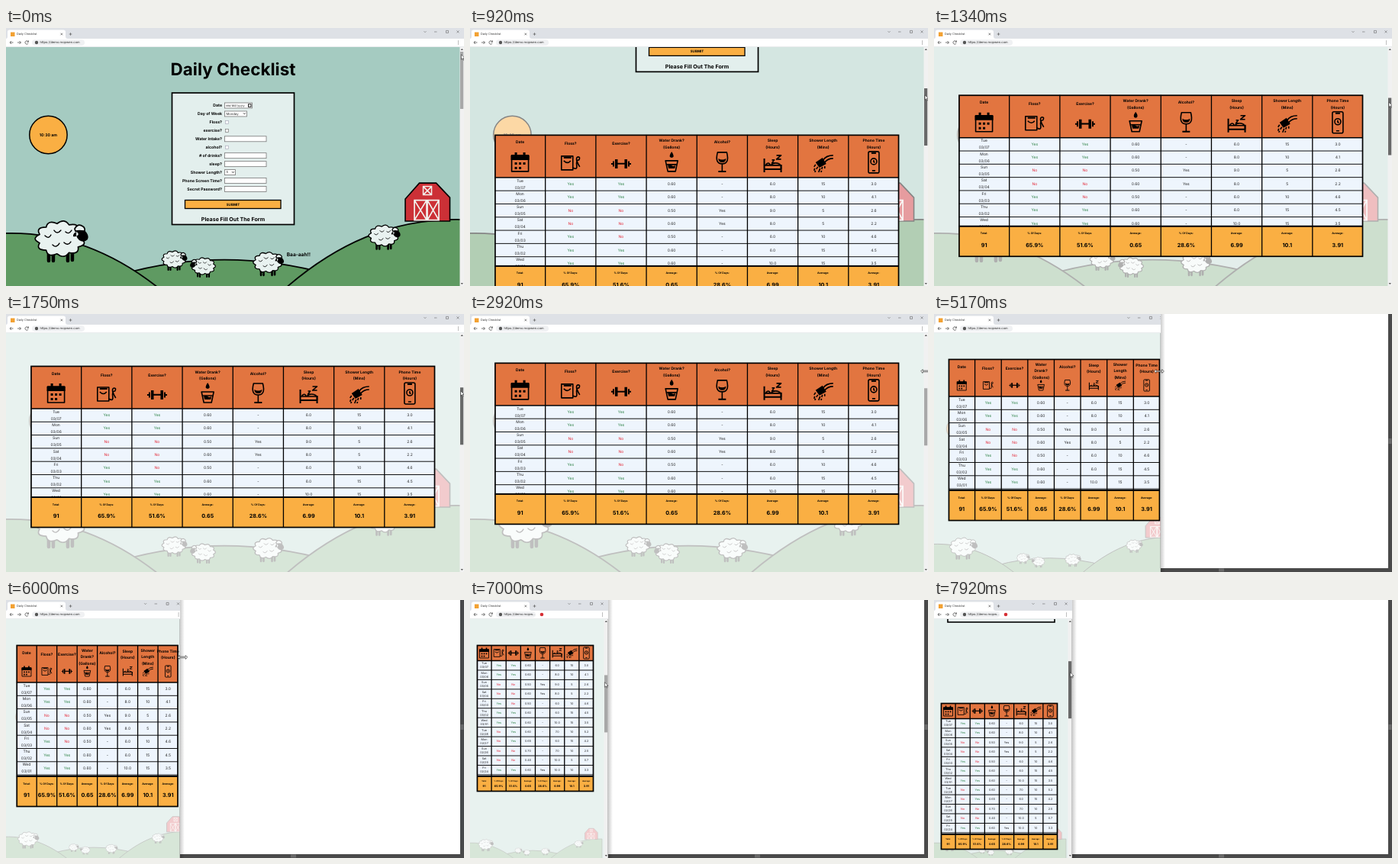
An HTML page with a canvas for the animation above (8000 ms loop, 600 by 338 pixels).

```html
<!DOCTYPE html>
<html lang="en">
<head>
<meta charset="utf-8">
<title>Daily Checklist</title>
<style>
html, body { margin: 0; width: 100%; height: 100%; overflow: hidden; background: #fff; }
canvas { display: block; width: 600px; height: 338px; }
</style>
</head>
<body>
<canvas id="stage" width="600" height="338"></canvas>
<script>
const ctx = document.getElementById('stage').getContext('2d');
const LOOP = 8000, W = 600, H = 338, PAGE_TOP = 25;
const START_TOP = 340, TEXT_SCALE = 10;
const ORANGE = '#faaf43', RUST = '#e27540', PALE = '#eef5fd';

// Keyframes: [time, value]
const motion = {
  tableTop: [[150, START_TOP], [920, 140], [1500, 68], [2600, 68], [3300, 59], [7080, 59], [7920, 135]],
  crop: [[3000, 600], [3920, 412], [5170, 297], [5900, 235], [6670, 181]],
  band: [[3300, 0], [3920, 13], [4700, 0]],
  left: [[3340, 32.5], [3920, 28], [5170, 19], [6750, 9]],
  right: [[3340, 562], [3920, 478], [5170, 296], [6750, 162]],
  head: [[3340, 56], [3920, 52], [5170, 49]],
  fade: [[250, 0], [920, 0.52], [1500, 0.75], [7200, 0.75], [7920, 0.72]],
  mouseX: [[0, 598], [2300, 597], [3000, 597], [3920, 407], [5170, 295], [6670, 180], [7000, 178], [7920, 180]],
  mouseY: [[150, 38], [920, 91], [1500, 104], [2300, 104], [2600, 75], [6600, 75], [6950, 111], [7080, 111], [7920, 98]]
};

const days = [
  'Tue 03/07 Yes Yes 0.60 - 6.0 15 3.0', 'Mon 03/06 Yes Yes 0.60 - 8.0 10 4.1',
  'Sun 03/05 No No 0.50 Yes 9.0 5 2.6', 'Sat 03/04 No No 0.60 Yes 8.0 5 2.2',
  'Fri 03/03 Yes No 0.50 - 6.0 10 4.6', 'Thu 03/02 Yes Yes 0.60 - 6.0 15 4.5',
  'Wed 03/01 Yes Yes 0.60 - 10.0 15 3.5', 'Tue 02/28 No Yes 0.60 - 7.0 10 5.2',
  'Mon 02/27 No Yes 0.65 - 6.0 15 4.2', 'Sun 02/26 No No 0.70 - 7.0 10 2.5',
  'Sat 02/25 No No 0.40 - 10.0 5 0.7', 'Fri 02/24 Yes Yes 0.60 Yes 10.0 10 3.3'
].map(row => row.split(' '));
const headings = ['Date', 'Floss?', 'Exercise?', 'Water Drank?|(Gallons)', 'Alcohol?', 'Sleep|(Hours)', 'Shower Length|(Mins)', 'Phone Time|(Hours)'];
const totals = ['Total:|91', '% Of Days:|65.9%', '% Of Days:|51.6%', 'Average:|0.65', '% Of Days:|28.6%', 'Average:|6.99', 'Average:|10.1', 'Average:|3.91'];

// Icons in a 24 unit box centred on the origin: [filled path, stroked path]
const icons = [
  ['M-12-9h24v6h-24zM-7-13h3v5h-3zM4-13h3v5h-3zM-7 0h3v3h-3zM-1.5 0h3v3h-3zM4 0h3v3h-3zM-7 6h3v3h-3zM-1.500 6h3v3h-3z', 'M-11-9h22v21h-22z'],
  ['M-9-8h10v2h-10z', 'M-12-9H3V9H-12zM-9-3q5 5 9 0M3 6q6 4 5-3t3-7q2-4-1-4t-2 5q2 5 4 8'],
  ['M-8-6h3.500V6h-3.500zM4.500-6h3.500V6h-3.500zM-11-3.500h2v7h-2zM9-3.500h2v7h-2zM-13-1h3v2h-3zM10-1h3v2h-3zM-5-1.200H5v1.200H-5z', 'M-5 0H5'],
  ['M0-14q5 7 0 8q-5-1 0-8zM-5 4q3-2 5 0t5 0L4 8H-4z', 'M-8-2H8L5 12H-5zM-6 3H6'],
  ['M-5-5q5 3 10 0q0 5-5 5t-5-5zM-5 11H5v2H-5z', 'M-6-13H6q4 15-6 15t-6-15zM0 2v10'],
  ['M-12-7h2V11h-2zM10 1h2v10h-2zM-11 6h22v2h-22z', 'M-11 2H11v5M-9 1q4-4 6 1M-2 1q6-4 12 0M-1-5h3l-3 4h3M5-11h6l-6 5h6'],
  ['M-10-1L-1-7L4 1L-5 6z', 'M0-4Q4-10 13-10M2-1Q6-6 13-6M-10 2l-2 3M-11 7l-1 3M-7 5l-2 3M-10 10l-1 2M-4 7l-2 5M-1 5l-1 3M-2 10l-1 2M2 4l0 3'],
  ['M-3-13h6v2h-6z', 'M-5-14H5Q7-14 7-12V12Q7 14 5 14H-5Q-7 14-7 12V-12Q-7-14-5-14zM-4-1a4 4 0 1 0 8 0a4 4 0 1 0-8 0M0-3v2.500l1.500 1M-2 11h4']
].map(pair => pair.map(d => new Path2D(d)));
const iconDrop = [36, 37, 38, 36, 36, 38, 37, 36];

function at(keys, t) {
  if (t <= keys[0][0]) return keys[0][1];
  for (let i = 1; i < keys.length; i++) {
    const [t0, v0] = keys[i - 1], [t1, v1] = keys[i];
    if (t < t1) return v0 + (v1 - v0) * (t - t0) / (t1 - t0);
  }
  return keys[keys.length - 1][1];
}

function rect(x, y, w, h, fill, stroke, line = 1) {
  if (fill) { ctx.fillStyle = fill; ctx.fillRect(x, y, w, h); }
  if (stroke) { ctx.strokeStyle = stroke; ctx.lineWidth = line; ctx.strokeRect(x, y, w, h); }
}

function shape(d, fill, stroke, line = 1) {
  const path = typeof d === 'string' ? new Path2D(d) : d;
  if (fill) { ctx.fillStyle = fill; ctx.fill(path); }
  if (stroke) { ctx.strokeStyle = stroke; ctx.lineWidth = line; ctx.stroke(path); }
}

function disc(x, y, r, fill, stroke, line) {
  const path = new Path2D();
  path.arc(x, y, r, 0, Math.PI * 2);
  shape(path, fill, stroke, line);
}

// Tiny type is set large and scaled down, so that hinting does not distort it.
function text(str, x, y, size, weight = 400, color = '#000', align = 'center', family = 'Inter, "Open Sans", sans-serif') {
  ctx.save();
  ctx.translate(x, y);
  ctx.scale(1 / TEXT_SCALE, 1 / TEXT_SCALE);
  ctx.font = `${weight} ${size * TEXT_SCALE}px ${family}`;
  ctx.textRendering = 'geometricPrecision';
  ctx.fillStyle = color;
  ctx.textAlign = align;
  ctx.textBaseline = 'middle';
  ctx.fillText(str, 0, 0);
  ctx.restore();
}

function within(x, y, w, h, draw) {
  ctx.save();
  ctx.beginPath();
  ctx.rect(x, y, w, h);
  ctx.clip();
  draw();
  ctx.restore();
}

function sheep(x, y, size, dir) {
  const line = 1.7 / Math.sqrt(size);
  ctx.save();
  ctx.translate(x, y);
  ctx.scale(size * dir, size);
  ctx.lineCap = ctx.lineJoin = 'round';
  shape('M-15 16V29M-9 17V29M10 16V29M16 15V28', null, '#000', 4.5);
  const fleece = new Path2D(), bumps = 11;
  const point = (i, k) => [28 * k * Math.cos(i / bumps * 2 * Math.PI), 20 * k * Math.sin(i / bumps * 2 * Math.PI)];
  fleece.moveTo(...point(0, 1));
  for (let i = 0; i < bumps; i++) fleece.quadraticCurveTo(...point(i + 0.5, 1.38), ...point(i + 1, 1));
  shape(fleece, '#e9f2f0', '#000', line);
  shape('M-20-4q5 5 8-1M-8-11q4 6 9 0M-10 8q5 5 9-2M5 5q5 5 9-1M7-9q4 4 8-2', null, '#000', 1.4);
  shape('M22-10q4-5 10-1q7 7 4 12q-5 5-11 1q-6-5-3-12zM22-9q-5 1-5 6q5 1 7-3z', '#000');
  shape('M19-13q4-8 11-3q3 2 2 6q-7-1-12 0z', '#e9f2f0', '#000', line);
  ctx.restore();
}

function barn() {
  shape('M523.5 253V224L542 203H564L582 222V253Z', '#cc3036', '#000', 1.6);
  ctx.lineJoin = 'miter';
  shape('M547 207.5h11v11h-11zl11 11m0-11l-11 11', null, '#f2f2ee', 1.5);
  shape('M535.5 225.5h16v26h-16zl16 26m0-26l-16 26M552.5 225.5h15v26h-15zl15 26m0-26l-15 26', null, '#f2f2ee', 1.7);
}

function scene(page, fade) {
  const s = page / 595;
  rect(0, PAGE_TOP, W, H, '#a5cbc1');
  const sunY = 140 + (1 - s) * 22;
  disc(55.5 * s, sunY, 24.7 * s, ORANGE, '#000', 1.5 * s);
  text('10:30 am', 55.5 * s, sunY, 5.2 * s, 700);
  ctx.save();
  ctx.translate(0, H * (1 - s));
  ctx.scale(s, s);
  const green = '#5f9a62';
  shape('M150 340V323Q285 284 425 323V340Z', green, '#000', 1.8);
  shape('M-5 345V269C70 266 140 292 203 343Z', green, '#000', 1.8);
  shape('M364 343C430 285 505 248 602 251V345Z', green, '#000', 1.8);
  barn();
  sheep(71, 276, 1, 1);
  sheep(220, 303, 0.48, 1);
  sheep(259, 312, 0.48, -1);
  sheep(343, 307, 0.58, 1);
  sheep(495, 272, 0.6, 1);
  if (fade === 0) text('Baa-aah!!', 368, 297, 6.6, 700, '#000', 'left');
  ctx.restore();
  rect(0, PAGE_TOP, W, H, `rgba(255,255,255,${fade})`);
}

function form(dy) {
  ctx.save();
  ctx.translate(0, dy);
  text('Daily Checklist', 297.5, 55, 22.5, 700);
  rect(217.5, 85, 160, 172.5, '#e3efed', '#000', 1.7);
  const fields = ['Date', 'Day of Week', 'Floss?', 'exercise?', 'Water Intake?', 'alcohol?', '# of drinks?', 'sleep?', 'Shower Length?', 'Phone Screen Time?', 'Secret Password?'];
  fields.forEach((label, i) => {
    const y = 101.5 + i * 10.95;
    text(label, 283, y, 5.2, 700, '#000', 'right');
    const box = w => rect(286.5, y - 3.5, w, 7, '#fff', '#777', 0.8);
    if (i === 0) {
      box(36);
      text('mm/dd/yyyy', 288.5, y, 4, 400, '#222', 'left', '"DejaVu Sans Mono", monospace');
      rect(317.5, y - 1.7, 3.5, 3.5, null, '#111', 0.9);
    } else if (i === 1 || i === 8) {
      const w = i === 1 ? 29 : 14;
      box(w);
      text(i === 1 ? 'Monday' : '5', 288.5, y, 4.2, 400, '#222', 'left');
      shape(`M${282 + w} ${y - 1}l1.4 1.5l1.4-1.5`, null, '#111', 0.8);
    } else if (i === 2 || i === 3 || i === 5) {
      rect(287.5, y - 2, 4, 4, '#fff', i === 3 ? '#777' : '#aab', 0.7);
    } else box(54.5);
  });
  rect(234.5, 225.5, 125.5, 11, ORANGE, '#000', 1.3);
  text('SUBMIT', 297.5, 231.2, 4.5, 700);
  text('Please Fill Out The Form', 297.5, 250.8, 7.1, 700);
  ctx.restore();
}

function icon(i, x, y, size) {
  ctx.save();
  ctx.translate(x, y);
  ctx.scale(size / 24, size / 24);
  ctx.lineJoin = 'round';
  shape(icons[i][0], '#000');
  shape(icons[i][1], null, '#000', 1.6);
  ctx.restore();
}

function table(top, left, right, head, narrow) {
  const col = (right - left) / 8, width = right - left;
  const wrapped = col < 46;
  const pitch = narrow ? 12.45 : 17.3;
  const foot = top + 172, bottom = top + (narrow ? 192 : 212);
  const headBottom = top + head;
  const mid = i => left + col * (i + 0.5);

  rect(left, top, width, bottom - top, PALE);
  within(left, headBottom, width, foot - headBottom, () => {
    const size = narrow ? 3.8 : 5;
    days.forEach((day, r) => {
      const y = headBottom + r * pitch, centre = y + pitch / 2;
      const gap = narrow ? 2.5 : 4.5;
      text(day[0], mid(0), centre - gap, size, 400, '#222');
      text(day[1], mid(0), centre + gap, size, 400, '#222');
      day.slice(2).forEach((value, c) => {
        const color = c > 1 ? '#222' : value === 'Yes' ? '#2c8044' : '#e3202f';
        text(value, mid(c + 1), centre, size, 400, color);
      });
      rect(left, y + pitch - 0.5, width, 1, '#111');
    });
  });

  rect(left, top, width, head, RUST);
  headings.forEach((heading, i) => {
    if (narrow) return icon(i, mid(i), top + 10.5, 13);
    let lines = heading.split('|');
    if (wrapped && (i === 3 || i === 6)) lines = heading.split(/[ |]/);
    const first = lines.length === 1 ? (i === 1 || i === 2 ? 12 : 10) : lines.length === 2 ? 8 : 7;
    lines.forEach((line, n) => text(line, mid(i), top + first + n * 8.7, 5, 700));
    icon(i, mid(i), top + (wrapped ? 34.5 : iconDrop[i] - (56 - head) / 3), wrapped ? 13 : 24 - (56 - head) * 0.5);
  });

  rect(left, foot, width, bottom - foot, ORANGE);
  totals.forEach((total, i) => {
    const [label, value] = total.split('|');
    text(label, mid(i), foot + (narrow ? 6 : 9.5), narrow ? 2.4 : 3.5, 700);
    text(value, mid(i), foot + (narrow ? 13 : 25), narrow ? 3.6 : 7.2, 700);
  });

  for (let i = 1; i < 8; i++) rect(left + col * i - 0.65, top, 1.3, bottom - top, '#000');
  rect(left, headBottom - 0.75, width, 1.5, '#000');
  rect(left, foot - 1, width, 2, '#000');
  rect(left + 0.5, top + 0.5, width - 1, bottom - top - 1, null, '#000', 1.7);
}

function chrome(edge, frame, narrow) {
  rect(0, 0, frame, 14, '#dee1e6');
  shape('M0 14Q2 14 2 11V5Q2 2.5 4.5 2.5H75Q78 2.5 78 5V11Q78 14 81 14Z', '#fff');
  rect(6, 5.5, 5.5, 5.5, '#f3a132');
  text('Daily Checklist', 14, 8.2, 3.8, 400, '#333', 'left');
  shape('M71.5 6.7l2.6 2.6m0-2.6l-2.6 2.6M82.7 8h3.600M84.5 6.2v3.600', null, '#555', 0.7);
  const x = frame - 51;
  shape(`M${x - 1.5} 4.2l1.5 1.5l1.5-1.5M${x + 12} 5h3.500M${x + 27.5} 3.400h3v3h-3zM${x + 41.5} 3.400l3 3m0-3l-3 3`, null, '#666', 0.6);

  rect(0, 14, edge, 11, '#fff');
  shape('M9.5 19H5m2-2l-2 2l2 2M15 19h4.500m-2-2l2 2l-2 2', null, '#555', 0.8);
  shape('M29.200 18a2.200 2.200 0 1 0 0 2M29.400 16.300v2h-2', null, '#555', 0.8);
  ctx.fillStyle = '#f0f1f3';
  ctx.beginPath();
  ctx.roundRect(34, 15.300, narrow ? 52 : 69, 7.600, 3.800);
  ctx.fill();
  disc(40, 19, 2.2, '#555');
  text(narrow ? 'https://demo.mopw…' : 'https://demo.mopwen.com', 44.5, 19.2, 4.1, 400, '#222', 'left');
  if (narrow) disc(94, 19, 2.3, '#d62f35');
  [17, 19, 21].forEach(y => disc(frame - 7.5, y, 0.5, '#555'));
  rect(0, 24.500, edge, 0.500, '#d5d8dc');
}

function scrollbar(edge, top, active) {
  rect(edge - 5.5, PAGE_TOP, 5.5, H, '#f1f1f1');
  rect(edge - 5, 31 + 0.24 * (START_TOP - top), 4.2, 75, active ? '#696969' : '#a8a8a8');
  shape(`M${edge - 4.3} 29l1.600-2l1.600 2zM${edge - 4.3} 334l1.600 2l1.600-2z`, '#555');
}

function pointer(x, y, resizing) {
  ctx.save();
  ctx.translate(x, y);
  ctx.scale(0.8, 0.8);
  if (resizing) shape('M-8 0l3-3v2h10v-2l3 3l-3 3v-2h-10v2z', '#fff', '#000', 0.7);
  else shape('M-2-4v8l2-1.800l1.400 3l1.300-.6l-1.400-2.800h2.600z', '#fff', '#000', 0.6);
  ctx.restore();
}

function desktop() {
  rect(0, 0, W, H, '#fff');
  rect(595, 0, 5, H, '#4a4a4a');
  rect(0, 333, W, 5, '#4a4a4a');
  rect(595.5, 163, 4, 7, '#6a6a6a');
  rect(373, 333.5, 7, 4, '#6a6a6a');
}

function shadow(x) {
  const soft = ctx.createLinearGradient(x, 0, x + 6, 0);
  soft.addColorStop(0, 'rgba(0,0,0,.2)');
  soft.addColorStop(1, 'rgba(0,0,0,0)');
  rect(x, 0, 6, H, soft);
}

function render(t) {
  const now = Object.fromEntries(Object.entries(motion).map(([name, keys]) => [name, at(keys, t)]));
  const { tableTop, crop, band, left, right, fade } = now;
  const page = left + right;
  const narrow = page < 220;
  const frame = Math.max(crop, (crop + page) / 2);
  const edge = crop + band;

  desktop();
  if (crop < W) {
    shadow(edge);
    rect(crop, 0, band, H, '#000');
  }
  within(0, 0, crop, H, () => {
    scene(page, fade);
    if (narrow) rect(18, -60, 140, tableTop - 46, '#e8f1f0', '#000', 1.6);
    else form(tableTop - START_TOP);
    table(tableTop, left, right, narrow ? 20.5 : now.head, narrow);
    scrollbar(frame, tableTop, (t > 150 && t < 2300) || t > 7080);
  });
  within(0, 0, crop, 14, () => chrome(edge, frame, narrow));
  within(0, 14, edge, 11, () => chrome(edge, frame, narrow));
  if (crop < W) rect(crop - 0.5, PAGE_TOP, 0.5, H, '#999');
  pointer(now.mouseX, now.mouseY, t > 2600 && t < 6700);
}

function tick() {
  render(performance.now() % LOOP);
  requestAnimationFrame(tick);
}
tick();
</script>
</body>
</html>
```
